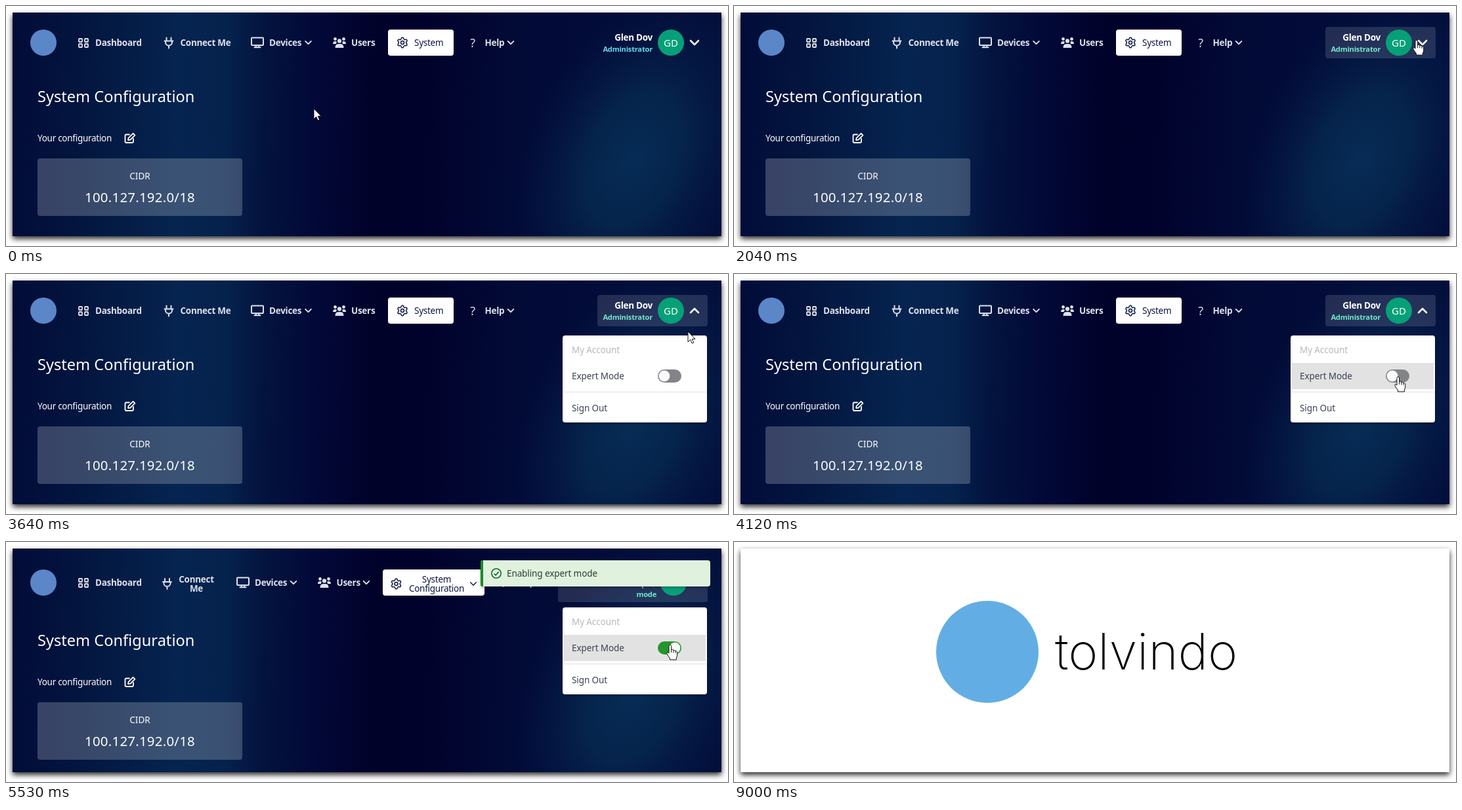
An HTML page for the animation above (9590 ms loop, 1100 by 367 pixels).

```html
<!DOCTYPE html>
<html lang="en">
<head>
<meta charset="utf-8">
<title>Expert mode</title>
<style>
  html, body { margin: 0; width: 100%; height: 100%; overflow: hidden; background: #fff; }
  svg { display: block; width: 1100px; height: 367px; }
  text { font-family: "Noto Sans", "Open Sans", sans-serif; font-size: 13.5px; white-space: pre; }
  .nav { font-weight: 600; letter-spacing: -.28px; fill: #dde1ec; }
  .tab { font-weight: 500; letter-spacing: -.26px; fill: #0c1740; }
  .item { font-weight: 500; letter-spacing: -.1px; fill: #3b4254; }
  .role { font-weight: 600; font-size: 11.2px; letter-spacing: -.25px; }
  .line { fill: none; stroke: #dde1ec; stroke-width: 2; stroke-linecap: round; stroke-linejoin: round; }
</style>
</head>
<body>
<svg id="stage" viewBox="0 0 1100 367" xmlns="http://www.w3.org/2000/svg">
  <defs>
    <linearGradient id="bands" gradientUnits="userSpaceOnUse" x1="10" y1="180" x2="1090" y2="200">
      <stop offset="0" stop-color="#020c39"/>
      <stop offset=".1" stop-color="#03163f"/>
      <stop offset=".23" stop-color="#05244f"/>
      <stop offset=".3" stop-color="#05224d"/>
      <stop offset=".355" stop-color="#03133e"/>
      <stop offset=".43" stop-color="#020837"/>
      <stop offset=".51" stop-color="#01022a"/>
      <stop offset=".58" stop-color="#01022b"/>
      <stop offset=".7" stop-color="#020a36"/>
      <stop offset="1" stop-color="#030f3b"/>
    </linearGradient>
    <radialGradient id="glow">
      <stop offset="0" stop-color="#062c56"/>
      <stop offset=".4" stop-color="#06284f" stop-opacity=".85"/>
      <stop offset="1" stop-color="#04194a" stop-opacity="0"/>
    </radialGradient>
    <clipPath id="win"><rect x="10" y="10" width="1080" height="342"/></clipPath>
    <filter id="drop" x="-5%" y="-10%" width="110%" height="125%">
      <feDropShadow dx="0" dy="4" stdDeviation="4.5" flood-color="#000" flood-opacity=".85"/>
    </filter>
    <filter id="soft" x="-10%" y="-15%" width="120%" height="135%">
      <feDropShadow dx="0" dy="2" stdDeviation="2" flood-color="#000" flood-opacity=".3"/>
    </filter>
  </defs>
</svg>
<script>
const LOOP = 9590;
const stage = document.getElementById('stage');

const text = (x, y, str, cls = '', extra = '') =>
  `<text x="${x}" y="${y}" class="${cls}" ${extra}>${str}</text>`;
const rect = (x, y, w, h, r, fill, extra = '') =>
  `<rect x="${x}" y="${y}" width="${w}" height="${h}" rx="${r}" fill="${fill}" ${extra}/>`;
const line = (d, extra = '') => `<path class="line" d="${d}" ${extra}/>`;
const at = (x, y, body, id = '') => `<g ${id && `id="${id}"`} transform="translate(${x} ${y})">${body}</g>`;
const middle = 'text-anchor="middle"';
const end = 'text-anchor="end"';

// Icons are centred on 0,0
const chevron = (w = 4.3, extra = '') => line(`M${-w} ${-w / 2}L0 ${w / 2}L${w} ${-w / 2}`, extra);
const squares = [[-7, -6], [2, -6], [-7, 2], [2, 2]]
  .map(([x, y]) => rect(x, y, 5, 5, .8, 'none', 'stroke="#dde1ec" stroke-width="1.8"')).join('');
const plug = line('M-3.5 -7.5v4M3.5 -7.5v4M-6.5 -2.5h13M-5 -2.5v2a5 5 0 0 0 10 0v-2M0 5v3.5');
const monitor = line('M-8 -7.5H8Q9 -7.5 9 -6.5V3Q9 4 8 4H-8Q-9 4 -9 3V-6.5Q-9 -7.5 -8 -7.5ZM-2 4.5L-2.5 7M2 4.5L2.5 7M-4.5 7.3h9', 'stroke-width="1.8"');
const people = `<g fill="#dde1ec"><circle cx="-6.5" cy="-5.5" r="2.4"/><circle cx="6.5" cy="-5.5" r="2.4"/>
  <path d="M-10 2Q-10 -2 -6.5 -2Q-4.8 -2 -4 -1Q-5 .4 -5 2ZM10 2Q10 -2 6.5 -2Q4.8 -2 4 -1Q5 .4 5 2Z"/>
  <circle cx="0" cy="-2.6" r="3.1"/><path d="M-6.5 8Q-6.5 2 -2 2H2Q6.5 2 6.5 8Z"/></g>`;
const gearPath = Array.from({ length: 60 }, (_, i) => {
  const a = i * Math.PI / 30;
  const r = 6.7 + 1.1 * Math.tanh(2 * Math.cos(6 * a + Math.PI));
  return (r * Math.cos(a)).toFixed(1) + ' ' + (r * Math.sin(a)).toFixed(1);
}).join('L');
const gear = `<g fill="none" stroke="#0c1740" stroke-width="1.5" stroke-linejoin="round">
  <path d="M${gearPath}Z"/><circle r="2.5"/></g>`;
const pencil = line('M-1 -5.5H-5.5Q-7.5 -5.5 -7.5 -3.5V5Q-7.5 7 -5.5 7H3Q5 7 5 5V1M-3 3L-2.4 -.2L4.6 -7.2L7.4 -4.4L.4 2.6Z', 'style="stroke:#fff;stroke-width:1.8"');
const question = text(0, 6.5, '?', 'nav', middle + ' style="font-size:18px;font-weight:500"');
const logo = '<circle r="20" fill="#5b86c8"/>';

const navBase = [
  at(57, 56, logo), at(118, 56, squares), text(136, 61, 'Dashboard', 'nav'),
  at(248, 56, plug), text(265.5, 61, 'Connect Me', 'nav'),
  at(383, 56, monitor), text(401, 61, 'Devices', 'nav'), at(460.5, 56, chevron()),
  at(508, 56, people), text(526, 61, 'Users', 'nav'),
  rect(582, 36, 100, 40, 4, '#fff'), at(604, 56, gear), text(622, 61, 'System', 'tab'),
  at(711, 56, question), text(729.5, 61, 'Help', 'nav'), at(769, 56, chevron()),
].join('');

const navExpert = [
  at(57, 62, logo), at(118, 62, squares), text(136, 67, 'Dashboard', 'nav'),
  at(245.5, 63.5, plug), text(290, 62, 'Connect', 'nav', middle), text(290, 76, 'Me', 'nav', middle),
  at(361, 62, monitor), text(379, 67, 'Devices', 'nav'), at(438, 62, chevron()),
  at(485, 62, people), text(503.5, 67, 'Users', 'nav'), at(549, 62, chevron()),
  rect(574, 42, 155, 40, 4, '#fff'), at(594.5, 64, gear),
  text(656, 62, 'System', 'tab', middle), text(656, 76, 'Configuration', 'tab', middle),
  at(712, 64, chevron(4.3, 'style="stroke:#0c1740;stroke-width:1.4"')),
  at(758, 62, question), text(776, 67, 'Help', 'nav'),
].join('');

const avatar = `<circle r="20" fill="#06a078"/>` +
  text(0, 5.7, 'GD', '', middle + ' fill="#fff" style="font-size:15px;font-weight:500"');

const userBase =
  rect(901, 32, 168, 48, 4, '#fff', 'id="panel" fill-opacity=".13"') +
  text(985, 53, 'Glen Dov', 'nav', end + ' style="fill:#fff"') +
  text(985, 70, 'Administrator', 'role', end + ' id="role"') + at(1013, 56, avatar) +
  at(1049, 56, chevron(6, 'style="stroke:#fff;stroke-width:2.6"'), 'arrow');

const userExpert =
  rect(841, 32, 228, 60, 4, '#fff', 'fill-opacity=".13"') +
  text(991, 52, 'Glen Dov', 'nav', end + ' style="fill:#fff"') +
  text(991, 68, 'Administrator expert', 'role', end + ' fill="#73e6cb"') +
  text(991, 84, 'mode', 'role', end + ' fill="#73e6cb"') + at(1017, 62, avatar) +
  at(1051, 62, chevron(6, 'transform="scale(1 -1)" style="stroke:#fff;stroke-width:2.6"'));

const content =
  text(48, 147, 'System Configuration', '', 'fill="#fff" style="font-size:23.6px"') +
  text(48, 207, 'Your configuration', '', 'fill="#fff" style="letter-spacing:-.28px"') +
  at(189, 202, pencil) + rect(48, 233, 312, 88, 4, '#fff', 'fill-opacity=".21"') +
  text(204, 265, 'CIDR', '', middle + ' fill="#fff"') +
  text(204, 300, '100.127.192.0/18', '', middle + ' fill="#fff" style="font-size:20.4px;letter-spacing:.25px"');

const menu =
  rect(848, 94, 220, 133, 4, '#fff', 'filter="url(#soft)"') +
  rect(850, 136, 216, 40, 0, '#e2e2e3', 'id="row"') +
  text(862, 121, 'My Account', 'item', 'style="fill:#b7b9c0"') +
  text(862, 161, 'Expert Mode', 'item') + text(862, 210, 'Sign Out', 'item') +
  rect(849, 180, 218, 1, 0, '#e0e2e8') +
  rect(993, 146, 36, 20, 10, '#828488', 'id="track"') +
  '<circle id="knob" cy="156" r="8.4" fill="#fafafa"/>';

const toast =
  rect(723, 28, 350, 40, 4, '#e0f1de', 'filter="url(#soft)"') +
  '<path d="M727 28V68H726Q723 68 723 65V31Q723 28 726 28Z" fill="#1e8a26"/>' +
  '<g fill="none" stroke="#17692f" stroke-width="1.6"><circle cx="747" cy="48" r="7.2"/><path d="M743.5 48.2L746 50.8L750.7 45.6"/></g>' +
  text(763, 53, 'Enabling expert mode', '', 'fill="#27412f" style="letter-spacing:-.1px"');

const pointers =
  '<g id="pointer" fill="#fff" stroke="#111" stroke-width="1" stroke-linejoin="round">' +
  '<path id="tip" d="M0 0V15.8L3.7 12.4L6.2 18L8.7 16.9L6.3 11.4H11Z"/>' +
  '<g id="hand"><path d="M-2 1.8Q-2 .3 -.2 .3T1.6 1.8V8Q2 7 3.4 7.3T4.8 8.8Q5.5 8 6.7 8.5T8 10Q8.6 9.4 9.6 9.9T10.7 11.8V16Q10.7 18 9.3 20V23H-.5V21L-4.5 15Q-5.5 13 -5 12T-3.2 11.8L-2 13.2Z"/>' +
  '<path fill="none" d="M1.6 8V12M4.8 8.8V12.4M8 10V12.8"/></g></g>';

const frame = rect(10, 10, 1080, 342, 0, '#fff', 'filter="url(#drop)"');

stage.insertAdjacentHTML('beforeend', frame +
  `<g id="app" clip-path="url(#win)">
    ${rect(10, 10, 1080, 342, 0, 'url(#bands)')}
    <ellipse cx="955" cy="235" rx="150" ry="265" fill="url(#glow)" transform="rotate(24 955 235) translate(-105 -0) scale(1.11 1)"/>
    <g id="navBase">${navBase}</g><g id="navExpert">${navExpert}</g>
    <g id="userBase">${userBase}</g><g id="userExpert">${userExpert}</g>
    <g id="content">${content}</g><g id="menu">${menu}</g><g id="toast">${toast}</g>${pointers}
  </g>
  <g id="brand"><circle cx="386" cy="168" r="78" fill="#62aee4"/>
    ${text(489, 195, 'tolvindo', '', 'style="font-family:Inter,Roboto,sans-serif;font-weight:200;font-size:77px"')}
  </g>`);

const $ = Object.fromEntries([...stage.querySelectorAll('[id]')].map(el => [el.id, el]));
const show = (el, on) => { el.style.display = on ? '' : 'none'; };
const ramp = (t, a, b) => Math.min(1, Math.max(0, (t - a) / (b - a)));
const smooth = p => p * p * (3 - 2 * p);

// Pointer moves: first step, last step, step count, goal, easing
const moves = [
  [320, 1220, 14, 808, 113, p => p ** 1.4],
  [1290, 2240, 14, 1050, 49, p => 1 - (1 - p) ** 2.1],
  [2310, 2370, 2, 1050, 52, p => p],
  [2570, 2640, 2, 1050, 59, p => p],
  [3430, 4120, 11, 1012, 157, smooth],
  [7400, 7540, 3, 1005, 156, p => p],
];

function pointerAt(t) {
  let x = 469, y = 157;
  for (const [from, to, n, gx, gy, ease] of moves) {
    if (t < from) break;
    const step = Math.floor((t - from) / (to - from) * (n - 1) + .001) + 1;
    const p = ease(Math.min(1, step / n));
    x += (gx - x) * p;
    y += (gy - y) * p;
  }
  return [x, y];
}

function draw(t) {
  const ending = t >= 9000;
  show($.app, !ending);
  show($.brand, ending);
  if (ending) return;

  const [x, y] = pointerAt(t);
  const expert = t >= 5260;
  const open = t >= 2900;
  const overUser = x >= 901 && y >= 32 && y <= 80;
  const overRow = open && x >= 850 && y >= 136;
  const hand = overUser || overRow;

  show($.navBase, !expert);
  show($.userBase, !expert);
  show($.navExpert, expert);
  show($.userExpert, expert);
  $.content.setAttribute('transform', `translate(0 ${expert ? 12 : 0})`);

  show($.panel, overUser || open);
  $.role.setAttribute('fill', overUser || open ? '#73e6cb' : '#67d8ec');
  $.arrow.setAttribute('transform', `translate(1049 56) rotate(${180 * ramp(t, 2970, 3170)})`);

  show($.menu, open);
  $.menu.setAttribute('opacity', .5 + .5 * ramp(t, 2900, 2970));
  $.menu.setAttribute('transform', `translate(0 ${expert ? 6 : 0})`);
  show($.row, overRow);
  $.knob.setAttribute('cx', 1003 + 16 * smooth(ramp(t, 5020, 5190)));
  $.track.setAttribute('fill', t >= 5120 ? '#25962b' : '#828488');

  show($.toast, t >= 5190);
  $.toast.setAttribute('opacity', smooth(ramp(t, 5120, 5500)));

  $.pointer.setAttribute('transform', `translate(${Math.round(x)} ${Math.round(y)})`);
  show($.hand, hand);
  show($.tip, !hand);
}

function tick() {
  draw(performance.now() % LOOP);
  requestAnimationFrame(tick);
}
tick();
</script>
</body>
</html>
```
